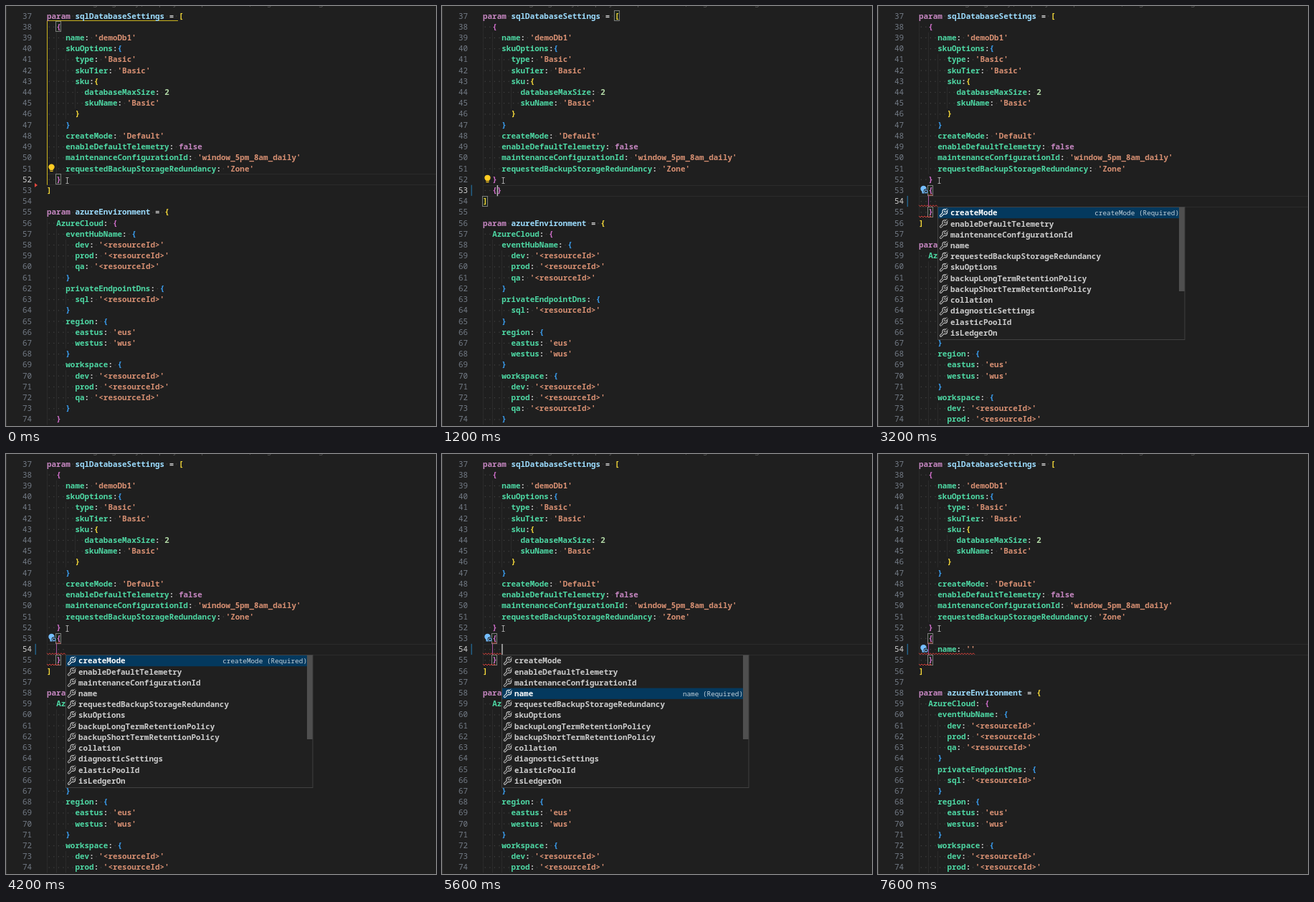
An HTML page with a canvas that plays this animation: 600x586 px, repeating every 8 s.

```html
<!DOCTYPE html>
<html lang="en">
<head>
<meta charset="utf-8">
<title>Code editor</title>
<style>
  html, body { margin: 0; width: 100%; height: 100%; overflow: hidden; background: #1f1f1f; }
  canvas { display: block; width: 600px; height: 586px; }
</style>
</head>
<body>
<canvas id="stage"></canvas>
<script>
const W = 600, H = 586, LOOP = 8000;
const LEFT = 57, TOP = 6.2, SIZE = 10.95, CW = SIZE * 0.6, LH = 15.216, FIRST = 37;
const FAMILY = '"Noto Sans Mono", "DejaVu Sans Mono", monospace';
const BG = '#1f1f1f';
const BRACKETS = ['#f5d93a', '#d06fcb', '#3a9ff2'];
const COLORS = {
  keyword: '#c586c0', variable: '#9cdcfe', key: '#4ed8a4',
  string: '#d68f72', number: '#b5dca8', plain: '#cccccc'
};

const settings = `param sqlDatabaseSettings = [
  {
    name: 'demoDb1'
    skuOptions:{
      type: 'Basic'
      skuTier: 'Basic'
      sku:{
        databaseMaxSize: 2
        skuName: 'Basic'
      }
    }
    createMode: 'Default'
    enableDefaultTelemetry: false
    maintenanceConfigurationId: 'window_5pm_8am_daily'
    requestedBackupStorageRedundancy: 'Zone'
  }`.split('\n');

const environment = `]

param azureEnvironment = {
  AzureCloud: {
    eventHubName: {
      dev: '<resourceId>'
      prod: '<resourceId>'
      qa: '<resourceId>'
    }
    privateEndpointDns: {
      sql: '<resourceId>'
    }
    region: {
      eastus: 'eus'
      westus: 'wus'
    }
    workspace: {
      dev: '<resourceId>'
      prod: '<resourceId>'
      qa: '<resourceId>'
    }
  }`.split('\n');

const options = ['createMode', 'enableDefaultTelemetry', 'maintenanceConfigurationId', 'name',
  'requestedBackupStorageRedundancy', 'skuOptions', 'backupLongTermRetentionPolicy',
  'backupShortTermRetentionPolicy', 'collation', 'diagnosticSettings', 'elasticPoolId', 'isLedgerOn'];

const canvas = document.getElementById('stage');
const ctx = canvas.getContext('2d');
const dpr = window.devicePixelRatio || 1;
canvas.width = W * dpr;
canvas.height = H * dpr;

const colX = c => LEFT + c * CW;
const lineY = n => TOP + (n - FIRST) * LH;
const within = (t, a, b) => t >= a && t < b;

function rect(x, y, w, h, color) {
  ctx.fillStyle = color;
  ctx.fillRect(x, y, w, h);
}

function text(str, x, y, color, weight = 600, size = SIZE, align = 'left') {
  ctx.font = `${weight} ${size}px ${FAMILY}`;
  ctx.textAlign = align;
  ctx.fillStyle = color;
  ctx.fillText(str, x, y);
}

function stroke(points, color, width = 1) {
  ctx.beginPath();
  points.forEach(([x, y]) => ctx.lineTo(x, y));
  ctx.strokeStyle = color;
  ctx.lineWidth = width;
  ctx.stroke();
}

function tokenColor(tok, rest, depth) {
  if (tok === 'param' || tok === 'false') return COLORS.keyword;
  if (tok[0] === "'") return COLORS.string;
  if (/^\d/.test(tok)) return COLORS.number;
  if (/^\w/.test(tok)) return rest[0] === ':' ? COLORS.key : COLORS.variable;
  if (/[[{\]}]/.test(tok)) return BRACKETS[depth % 3];
  return COLORS.plain;
}

function drawGuides(line, y) {
  const indent = line.search(/\S|$/);
  for (let c = 0; c < indent; c += 2) rect(Math.round(colX(c)), y, 1, LH, '#2b2b2b');
}

function drawCode(lines) {
  let depth = 0;
  lines.forEach((line, i) => {
    const y = lineY(FIRST + i);
    for (const m of line.matchAll(/'[^']*'|\w+|\S| /g)) {
      const tok = m[0], x = colX(m.index);
      if (tok === ' ') {
        rect(x + CW / 2 - 0.6, y + 7.2, 1.2, 1.2, '#444444');
        continue;
      }
      if (/[\]}]/.test(tok)) depth--;
      text(tok, x, y + 11.3, tokenColor(tok, line.slice(m.index + tok.length), depth));
      if (/[[{]/.test(tok)) depth++;
    }
  });
}

function bracketBox(line, col) {
  const x = Math.round(colX(col)) - 0.5, y = Math.round(lineY(line)) + 0.5;
  rect(x, y, CW + 0.5, LH - 1, 'rgba(0,100,0,.1)');
  ctx.strokeStyle = '#7d7d7d';
  ctx.lineWidth = 1;
  ctx.strokeRect(x, y, CW + 0.5, LH - 1.2);
}

function squiggle(line, from, to) {
  const y = lineY(line) + LH - 1.3, pts = [];
  for (let x = colX(from), k = 0; x <= colX(to); x += 2, k++) pts.push([x, y + (k % 2 ? 1 : -1)]);
  stroke(pts, '#d8403a', 1);
}

function bulb(line, color, fix) {
  const x = 63.5, y = lineY(line) + 5.4;
  rect(58, y - 5, 11, 12, BG);
  ctx.fillStyle = color;
  ctx.beginPath();
  ctx.arc(x, y, 4.2, 0, Math.PI * 2);
  ctx.fill();
  rect(x - 2, y + 3, 4, 3.4, color);
  if (!fix) return rect(x - 2, y + 4.4, 4, 0.8, BG);
  ctx.fillStyle = BG;
  ctx.beginPath();
  ctx.arc(x + 3.3, y + 3.5, 3.2, 0, Math.PI * 2);
  ctx.fill();
  ctx.beginPath();
  ctx.arc(x + 3.5, y + 3.7, 2, 0, Math.PI * 2);
  ctx.strokeStyle = color;
  ctx.lineWidth = 1.1;
  ctx.stroke();
}

// Outlined spanner: a round head with a notch at the upper right, and a handle.
function wrench(x, y, color, back) {
  const handle = [[x - 3.9, y + 4], [x + 1, y - 0.9]];
  const head = (r, fill) => {
    ctx.fillStyle = fill;
    ctx.beginPath();
    ctx.arc(x + 1.8, y - 1.8, r, 0, Math.PI * 2);
    ctx.fill();
  };
  ctx.lineCap = 'round';
  stroke(handle, color, 3.4);
  head(3.9, color);
  stroke(handle, back, 1.5);
  head(2.8, back);
  stroke([[x + 2.2, y - 2.2], [x + 5, y - 5]], color, 3);
  stroke([[x + 2.6, y - 2.6], [x + 6, y - 6]], back, 1.9);
  ctx.lineCap = 'butt';
}

function drawPopup(selected) {
  const x = 83, y = 281, w = 345.5, h = 185, panel = '#202020', active = '#04395e';
  rect(x, y, w, h, panel);
  options.forEach((name, i) => {
    const top = y + i * LH, on = i === selected;
    if (on) rect(x, top, 337, LH, active);
    wrench(91.5, top + 7.7, on ? '#ffffff' : '#c5c5c5', on ? active : panel);
    text(name, 101, top + 11.4, on ? '#ffffff' : '#cccccc', on ? 700 : 600);
    if (on) text(`${name} (Required)`, 420, top + 11.2, '#c3d0da', 500, 9.36, 'right');
  });
  rect(420, y, 8, 117, '#4f4f4f');
  ctx.strokeStyle = '#414141';
  ctx.lineWidth = 1;
  ctx.strokeRect(x + 0.5, y - 0.5, w - 1, h);
}

function ibeam(x, y) {
  stroke([[x, y - 4], [x, y + 4]], '#a5a5a5');
  stroke([[x - 2, y - 4], [x + 2, y - 4]], '#a5a5a5');
  stroke([[x - 2, y + 4], [x + 2, y + 4]], '#a5a5a5');
}

function inserted(t) {
  if (t < 200) return [];
  if (t < 1200) return ['  '];
  if (t < 1600) return ['  {}'];
  const body = t < 6000 ? '    ' : t < 7000 ? '    name: ' : "    name: ''";
  return ['  {', body, '  }'];
}

function cursorAt(t) {
  if (t < 200) return [52, 3];
  if (t < 1200) return [53, 2];
  if (t < 1600) return [53, 3];
  return [54, t < 6000 ? 4 : t < 7000 ? 10 : 11];
}

const blinkOn = [[200, 600], [1000, 2200], [2800, 3200], [4000, 4200], [4600, 5200], [5600, 7600]];

function drawMarks(t) {
  if (t < 1200) {
    const end = lineY(t < 200 ? 53 : 54);
    stroke([[240, 20.5], [57.5, 20.5], [57.5, end]], '#c9b21f');
  }
  if (t < 200) {
    bracketBox(38, 2);
    bracketBox(52, 2);
    ctx.fillStyle = '#e0483e';
    ctx.beginPath();
    ctx.moveTo(40, 247);
    ctx.lineTo(44, 250);
    ctx.lineTo(40, 253);
    ctx.fill();
  } else if (t < 1600) {
    bracketBox(37, 28);
    bracketBox(54, 0);
  } else {
    bracketBox(53, 2);
    bracketBox(55, 2);
    stroke([[70.5, lineY(54)], [70.5, lineY(55)]], '#a855a0');
  }
}

function drawProblems(t) {
  if (within(t, 2000, 6200) || t >= 7400) {
    squiggle(53, 2, 3);
    squiggle(54, 0, t < 7400 ? 4 : 12);
    squiggle(55, 0, 3);
    bulb(t < 7400 ? 53 : 54, '#75beff', true);
  } else if (within(t, 6200, 7000)) {
    squiggle(54, 9.6, 10.3);
  }
  if (t < 600) bulb(51, '#ffcc22');
  else if (t < 1600) bulb(52, '#ffcc22');
}

function draw(t) {
  ctx.setTransform(dpr, 0, 0, dpr, 0, 0);
  rect(0, 0, W, H, BG);
  rect(0, 0, 1, H, '#353535');
  text('using registry, deployment parameters, region settings', 95, -0.6, '#555555', 500);

  const lines = [...settings, ...inserted(t), ...environment].slice(0, 38);
  const [row, col] = cursorAt(t);
  const y = Math.round(lineY(row));
  rect(LEFT, y, W - LEFT, 1, '#2b2b2b');
  rect(LEFT, y + 15, W - LEFT, 1, '#2b2b2b');

  lines.forEach((line, i) => {
    const n = FIRST + i, top = lineY(n);
    text(n, 23, top + 11.3, n === row ? '#d0d0d0' : '#737b86', 500);
    drawGuides(line, top);
  });
  if (t >= 200) rect(40.5, lineY(row), 1.5, LH, '#235f85');

  drawMarks(t);
  drawCode(lines);
  drawProblems(t);
  if (blinkOn.some(([a, b]) => within(t, a, b))) rect(colX(col), y, 1.4, LH, '#c0c0c0');
  if (within(t, 2800, 6000)) {
    drawPopup(t < 4600 ? 0 : Math.min(3, 1 + Math.floor((t - 4600) / 200)));
  }
  ibeam(85.5, 243.5);
}

function tick(now) {
  draw(now % LOOP);
  requestAnimationFrame(tick);
}
draw(0);
requestAnimationFrame(tick);
</script>
</body>
</html>
```
